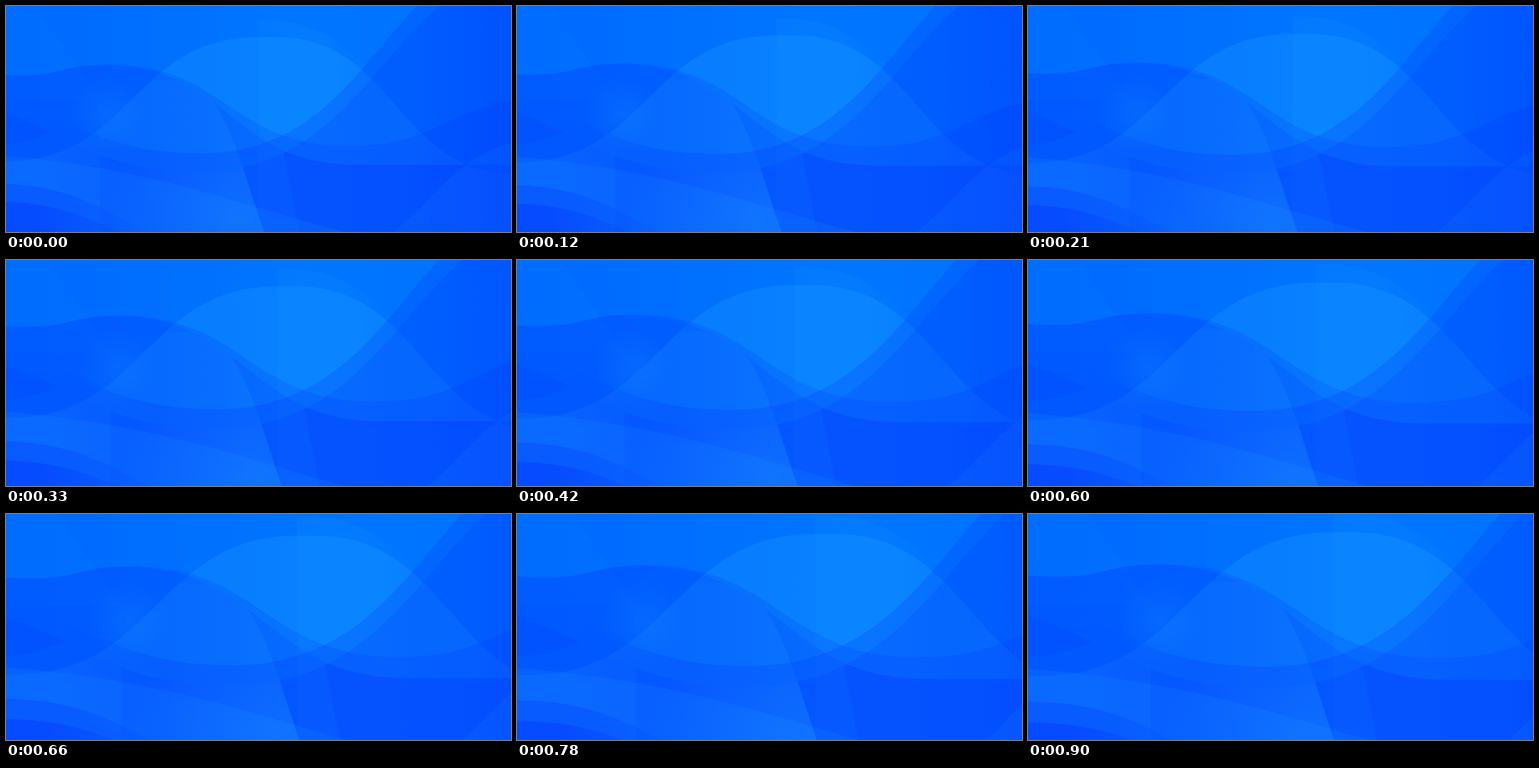
Recreate the animation shown at these times as an HTML page with a canvas. Size 750x336 px, loop 930 ms.

```html
<!DOCTYPE html>
<html lang="en">
<head>
<meta charset="utf-8">
<title>Blue waves</title>
<style>
  html, body { margin: 0; width: 100%; height: 100%; overflow: hidden; background: #005cff; }
  canvas { display: block; }
</style>
</head>
<body>
<canvas id="stage" width="750" height="336"></canvas>
<script>
const ctx = document.getElementById('stage').getContext('2d');
const STEP = 30, STEPS = 31;
const ZOOM = .155, FOCUS_X = -132, FOCUS_Y = 168;
const LIGHT = '40,175,255', DARK = '0,40,255';

// Area below a smooth wave that is level at each given crest or trough
function swell(...turns) {
  const path = new Path2D();
  let [x, y] = turns[0];
  path.moveTo(x, 500);
  path.lineTo(x, y);
  for (const [nx, ny] of turns.slice(1)) {
    const mid = (x + nx) / 2;
    path.bezierCurveTo(mid, y, mid, ny, nx, ny);
    [x, y] = [nx, ny];
  }
  path.lineTo(x, 500);
  return path;
}

const wave = swell([-80, 98], [22, 103], [145, 88], [520, 236], [900, 236]);
const waveUpper = swell([-80, 98], [22, 103], [150, 87], [510, 208], [800, 138]);
const hill = swell([-40, 231], [0, 231], [375, 46], [400, 46], [760, 251], [850, 251]);
const hillUpper = swell([375, 21], [385, 21], [690, 165]);
const bowl = swell([-100, 130], [290, 219], [830, -105]);
const bowlLower = swell([-130, 142], [288, 246], [832, -70]);
const shade = swell([-30, 207], [140, 176]);
const beam = swell([-40, 110], [255, 110], [475, 450]);
const floor = swell([-200, 215], [950, 385]);
const corner = swell([-20, 264], [350, 360]);
const cornerDark = swell([-20, 291], [320, 365]);
const ramp = swell([460, 372], [800, 198]);
const slant = new Path2D('M-40 0H45L140 140H-40Z');
const spoke = new Path2D('M412 218 435 336H800V218Z');

function stops(gradient, ...colours) {
  colours.forEach((c, i) => gradient.addColorStop(i / (colours.length - 1), c));
  return gradient;
}
const tint = (tone, alpha) => `rgba(${tone},${alpha})`;
const fade = (tone, alpha, from, to) =>
  stops(ctx.createLinearGradient(from, 0, to, 0), tint(tone, 0), tint(tone, alpha));
const glow = (alpha, x, y, radius) =>
  stops(ctx.createRadialGradient(x, y, 0, x, y, radius), tint(LIGHT, alpha), tint(LIGHT, 0));

const sky = stops(ctx.createLinearGradient(40, 0, 820, 0), '#006aff', '#0076ff', '#0070ff');

// Translucent sheets; each fills the overlap of its shapes
const sheets = [
  [sky],
  [tint(LIGHT, .04), slant],
  [fade(LIGHT, .08, 540, 470), hillUpper],
  [tint(LIGHT, .2), hill],
  [tint(DARK, .14), waveUpper],
  [tint(DARK, .12), wave],
  [glow(.14, 150, 160, 55), wave],
  [fade(LIGHT, .12, 150, 340), wave, hill, beam],
  [fade(DARK, .18, 60, 200), bowl],
  [tint(DARK, .13), bowlLower],
  [fade(DARK, .25, 600, 800), bowlLower],
  [tint(LIGHT, .06), bowlLower, shade],
  [tint(DARK, .13), wave, bowlLower, spoke],
  [glow(.2, 345, 320, 190), bowlLower, beam],
  [tint(LIGHT, .1), floor],
  [fade(DARK, .22, 230, 60), corner],
  [fade(DARK, .3, 200, 40), cornerDark],
  [tint(LIGHT, .08), ramp]
];

function draw() {
  const step = Math.floor((performance.now() - start) / STEP) % STEPS;
  const scale = 1 + ZOOM * step / (STEPS - 1);
  ctx.setTransform(scale, 0, 0, scale, FOCUS_X * (1 - scale), FOCUS_Y * (1 - scale));
  for (const [fill, ...shapes] of sheets) {
    ctx.save();
    shapes.forEach(shape => ctx.clip(shape));
    ctx.fillStyle = fill;
    ctx.fillRect(-40, -10, 850, 400);
    ctx.restore();
  }
  requestAnimationFrame(draw);
}
const start = performance.now();
draw();
</script>
</body>
</html>
```
